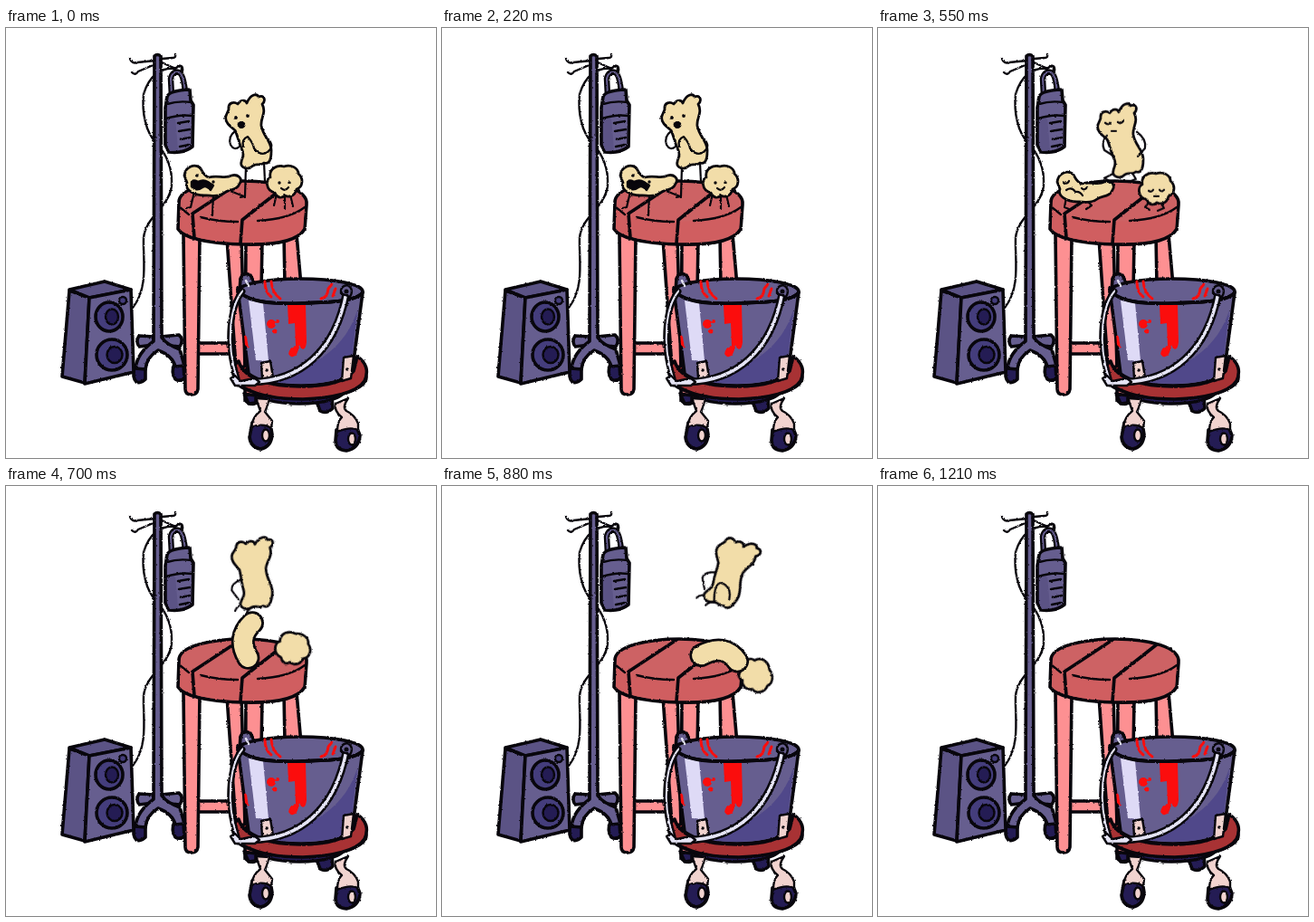
These frames come from a looping animation (475 by 475 pixels, 1.24 s). An HTML page:

```html
<!DOCTYPE html>
<html lang="en">
<head>
<meta charset="utf-8">
<title>Into the bucket</title>
<style>
  html, body { margin: 0; width: 100%; height: 100%; overflow: hidden; background: #fff; }
  svg { display: block; width: 100%; height: 100%; }
  path, ellipse, circle { stroke: #08060c; stroke-width: 3.6; stroke-linejoin: round; stroke-linecap: round; }
  .line { fill: none; }
  .thin { stroke-width: 2.4; }
  .flat { stroke: none; }
  .ink { fill: #08060c; }
  .purple { fill: #665e8f; }
  .mid { fill: #5b5385; }
  .dark { fill: #443d7c; }
  .navy { fill: #241c54; }
  .leg { fill: #fd9092; }
  .seat { fill: #cd6264; }
  .pale { fill: #f1d3cf; }
  .blood { fill: #fb0d0d; stroke: none; }
  .trickle { fill: none; stroke: #fb0d0d; stroke-width: 3; }
  .skin { fill: #f2dda9; stroke-width: 2.8; }
  .limb { fill: none; stroke-width: 2.2; }

  #tall, #round, #bean, .awake, .squat, .fly, .tuck { animation: 1240ms linear infinite; }
  .awake, .squat, .fly, .tuck { animation-timing-function: step-end; }
  .awake { animation-name: awake; }
  .squat { animation-name: squat; }
  .fly { animation-name: fly; }
  .tuck { animation-name: tuck; }
  #tall { transform-origin: 268px 114px; animation-name: tall; }
  #round { transform-origin: 308px 170px; animation-name: round; }
  #bean { animation-name: bean; }
  .spine path { fill: none; animation: spine 1240ms linear infinite; }
  .spine .edge { stroke-width: 26; }
  .spine .core { stroke: #f2dda9; stroke-width: 20.5; }

  @keyframes awake { 0% { visibility: visible } 25%, 100% { visibility: hidden } }
  @keyframes squat { 0% { visibility: hidden } 25% { visibility: visible } 49%, 100% { visibility: hidden } }
  @keyframes fly { 0% { visibility: hidden } 49% { visibility: visible } 92%, 100% { visibility: hidden } }
  @keyframes tuck { 0% { visibility: hidden } 62% { visibility: visible } 92%, 100% { visibility: hidden } }

  @keyframes tall {
    0%, 20% { transform: none; animation-timing-function: ease-in-out }
    32% { transform: translate(-1px, 8px) }
    46% { transform: translate(0, 10px); animation-timing-function: ease-in }
    56.45% { transform: translate(4px, -18px) rotate(8deg); animation-timing-function: ease-out }
    63.7% { transform: translate(27px, -50px) rotate(21deg); animation-timing-function: ease-in }
    70.97% { transform: translate(49px, -21px) rotate(34deg) }
    78.2% { transform: translate(63px, 55px) rotate(68deg) }
    85.48% { transform: translate(72px, 147px) rotate(103deg) }
    91%, 100% { transform: translate(72px, 236px) rotate(115deg) }
  }
  @keyframes round {
    0%, 20% { transform: none; animation-timing-function: ease-in-out }
    32% { transform: translate(0, 6px) }
    46% { transform: translate(0, 8px) }
    51% { transform: translate(4px, -6px) }
    56.45% { transform: translate(9px, 10px) rotate(12deg) }
    63% { transform: translate(24px, 12px) rotate(40deg) }
    70.97% { transform: translate(38px, 39px) rotate(70deg) }
    85.48% { transform: translate(37px, 136px) rotate(110deg) }
    90%, 100% { transform: translate(37px, 175px) rotate(120deg) }
  }
  @keyframes bean {
    0%, 20% { transform: none }
    32%, 100% { transform: translate(1px, 7px) }
  }
  @keyframes spine {
    0%, 48% { d: path("M208 172Q225 189 249 178") }
    56.45% { d: path("M272 151Q254 168 267 190") }
    63.7% { d: path("M269 173Q276 157 300 168") }
    70.97% { d: path("M286 187Q312 173 326 193") }
    78.2% { d: path("M322 192Q344 199 336 232") }
    85.48% { d: path("M335 233Q351 256 338 276") }
    91%, 100% { d: path("M334 322Q354 344 338 365") }
  }
</style>
</head>
<body>
<svg viewBox="0 0 475 475">
  <defs>
    <filter id="rough" filterUnits="userSpaceOnUse" x="0" y="0" width="475" height="475" color-interpolation-filters="sRGB">
      <feTurbulence type="fractalNoise" baseFrequency=".35" numOctaves="2" seed="4"/>
      <feDisplacementMap in="SourceGraphic" scale="2.2" xChannelSelector="R" yChannelSelector="G"/>
    </filter>
  </defs>

  <g filter="url(#rough)">
    <!-- drip stand -->
    <path class="line thin" d="M187 45C171 43 158 53 152 73C150 93 154 115 166 127C177 139 184 155 183 174C180 199 154 208 152 232C151 255 158 286 140 309"/>
    <path class="line thin" d="M137 34Q139 40 145 38L165 36M172 34L184 33Q188 33 187 29M165 40L146 48Q143 53 139 49M172 38L183 43Q188 46 190 42"/>
    <path class="purple" d="M163 341L147 340Q143 346 147 352L163 350ZM171 341L191 339Q197 344 192 352L171 350Z"/>
    <path class="navy" d="M142 375L154 376L154 388Q149 393 144 391Q139 386 142 375ZM186 371L196 372L197 387Q192 391 187 388Q182 380 186 371Z"/>
    <path class="purple" d="M164 31Q167 28 171 31L172 342Q178 350 192 355L197 373L187 374Q184 362 168 356Q155 364 154 377L143 376Q145 359 163 346Z"/>
    <path class="line" d="M191 42Q196 42 194 49"/>
    <path class="line" d="M183 75L182 56Q184 47 191 49Q196 51 198 71" style="stroke-width:6.500"/>
    <path class="line" d="M183 75L182 56Q184 47 191 49Q196 51 198 71" style="stroke:#665e8f;stroke-width:2"/>
    <path class="purple" d="M178 76Q180 69 203 68L204 80L207 85L206 131Q196 139 180 137L176 129L176 88Z"/>
    <path class="mid flat" d="M178 101L187 99L190 135L181 136L178 129Z"/>
    <path class="line thin" d="M178 84Q190 80 205 82M177 100Q192 95 206 97"/>
    <path class="line" d="M190 105L202 103M191 114L203 112M193 123L203 121M192 131L202 129" style="stroke-width:2.500"/>

    <!-- speaker -->
    <path class="mid" d="M70 290L92 298L87 392L62 385Z"/>
    <path class="mid" d="M70 289L109 280L138 289L92 298Z"/>
    <path class="purple" d="M92 298L138 289L141 380L87 393Z"/>
    <ellipse class="dark" cx="114" cy="319" rx="15" ry="16"/>
    <ellipse class="navy thin" cx="117" cy="319" rx="7" ry="8.500"/>
    <ellipse class="dark" cx="117" cy="361" rx="17" ry="17"/>
    <ellipse class="navy thin" cx="120" cy="361" rx="8.500" ry="9"/>
    <circle class="dark thin" cx="129" cy="301" r="4"/>
    <circle class="ink flat" cx="131" cy="291" r="1.500"/>

    <!-- stool -->
    <path class="leg" d="M206 348H264V360H206Z"/>
    <path class="leg" d="M244 232H260L264 375H254ZM307 228H321L326 285H308Z"/>
    <path class="leg" d="M265 234H283L280 411Q272 420 264 411Z"/>
    <path class="leg" d="M196 228H214L212 399Q211 405 205 405Q198 405 198 399Z"/>
    <path class="seat" d="M191 193C190 176 230 169 262 169C300 169 334 178 332 195L330 222C322 236 293 240 261 239C227 238 197 233 190 222Z"/>
    <path class="flat" fill="#d05e60" d="M193 199Q220 214 262 214Q312 212 330 198L328 221C321 233 292 237 261 237C227 236 199 231 192 221Z"/>
    <path class="line" d="M259 170L206 205L208 232M308 175L261 212L259 238"/>
    <path class="line thin" d="M192 198L202 206M215 209Q234 214 256 214M278 213Q313 211 330 198"/>

    <!-- dolly -->
    <path class="navy" d="M342 410L360 408L361 420Q354 427 347 423ZM263 404L276 406L276 414L268 415Z"/>
    <ellipse class="navy" cx="324" cy="400" rx="50" ry="15"/>
    <ellipse cx="325" cy="386" rx="73" ry="23" fill="#a83234"/>
    <ellipse cx="325" cy="383" rx="62" ry="19" fill="#812529"/>

    <!-- bucket inside -->
    <path class="purple" d="M258 291L259 277Q262 269 270 273L275 283Z"/>
    <ellipse class="purple" cx="325" cy="291" rx="69" ry="14"/>
    <path class="trickle" d="M286 280Q286 292 293 297M293 280Q294 293 303 299M348 299Q355 298 356 288L360 283M361 296L364 288"/>
  </g>

  <g filter="url(#rough)">
    <!-- rounded friend -->
    <g id="round">
      <g class="awake"><path class="limb" d="M299 183L296 196M308 186V200M314 184L317 197"/></g>
      <g class="squat"><path class="limb" d="M300 184L295 190L300 193M312 185L316 191L309 194"/></g>
      <path class="skin" d="M297 182C286 179 287 167 292 165C290 155 300 151 307 153C315 150 323 155 323 161C329 166 328 176 321 178C319 187 311 187 308 185C304 189 299 187 297 182Z"/>
      <g class="awake">
        <circle class="ink flat" cx="302" cy="171" r="1.700"/><circle class="ink flat" cx="313" cy="171" r="1.700"/>
        <path class="limb" d="M304 177Q308 181 312 176"/>
      </g>
      <g class="squat"><path class="limb" d="M299 172Q302 174 304 171M311 171Q313 174 316 171M305 178H310"/></g>
    </g>

    <!-- tall friend -->
    <g id="tall">
      <g class="awake"><path class="limb" d="M265 152L264 186L259 187M285 148L286 170"/></g>
      <g class="squat"><path class="limb" d="M260 151L250 156L257 160M280 149L285 157L277 160"/></g>
      <g class="fly"><path class="limb" d="M256 124Q246 130 248 137L257 146M268 150Q257 150 255 159M278 150Q268 154 268 160"/></g>
      <path class="skin" d="M246 90C245 82 252 81 256 84C260 78 265 80 266 83C270 73 277 72 279 76C286 73 287 81 283 84C288 94 281 99 282 108C284 120 294 126 293 136C293 145 291 151 285 149C280 153 276 149 273 152C267 158 258 154 260 148C260 144 264 142 261 135C257 127 256 119 253 113C248 109 241 104 243 97Z"/>
      <g class="tuck"><path class="limb" d="M274 152Q262 135 268 130Q280 126 286 140"/></g>
      <g class="awake">
        <circle class="ink flat" cx="254" cy="99" r="1.900"/><circle class="ink flat" cx="267" cy="97" r="1.900"/>
        <ellipse class="ink flat" cx="260" cy="107" rx="4.500" ry="4"/>
        <path class="limb" d="M253 114Q245 120 248 129Q252 136 258 131M262 131Q260 123 267 120Q273 127 274 133Q281 142 289 137Q297 131 290 123"/>
      </g>
      <g class="squat">
        <path class="limb" d="M251 95Q255 98 257 95M265 94Q268 97 271 93M258 104H263"/>
        <path class="limb" d="M253 109Q246 116 250 125L261 132M286 105Q297 113 295 123L287 132"/>
      </g>
    </g>

    <!-- lying friend -->
    <g id="bean">
      <g class="awake"><path class="limb" d="M208 181L204 198L199 199M229 184L228 207M245 179L263 186"/></g>
      <g class="squat"><path class="limb" d="M207 180L205 191L210 193M230 184L235 189L229 193"/></g>
      <g class="awake">
        <path class="skin" d="M197 163C198 153 208 150 214 154C217 157 217 163 224 165C234 162 242 167 249 163C256 161 262 166 258 172C255 180 246 178 241 182C234 188 225 184 219 185C207 185 197 178 200 171Z"/>
        <path class="ink thin" d="M205 170Q208 167 212 170Q218 167 223 170L229 174L226 179Q221 173 217 176Q210 181 205 175Z"/>
        <circle class="ink flat" cx="211" cy="163" r="1.700"/><circle class="ink flat" cx="229" cy="170" r="1.700"/>
      </g>
      <g class="squat">
        <path class="skin" d="M197 163C198 153 208 150 214 154C217 157 217 163 224 165C234 162 242 167 249 163C256 161 262 166 258 172C255 180 246 178 241 182C234 188 225 184 219 185C207 185 197 178 200 171Z"/>
        <path class="limb" d="M204 164Q208 166 210 162M224 170Q227 173 230 169M207 172Q213 168 217 174Q222 173 225 178"/>
      </g>
    </g>
    <g class="fly spine">
      <path class="edge" d="M208 172Q225 189 249 178"/>
      <path class="core" d="M208 172Q225 189 249 178"/>
    </g>
  </g>

  <g filter="url(#rough)">
    <!-- bucket front -->
    <path class="purple" d="M256 289C266 304 302 305 327 304C359 303 387 302 394 292L382 383Q362 395 326 395Q285 395 268 382Z"/>
    <path class="flat" fill="#50488a" d="M388 312C376 350 345 377 284 389Q300 393 326 393Q361 393 380 382Z"/>
    <path class="flat" fill="#dedaf6" d="M268 301L284 304L290 368L276 367Z"/>
    <path class="blood" d="M311 306H331L332 347Q331 357 326 354L324 350Q322 365 315 363Q310 360 314 355L320 351L319 326L312 327ZM263 338L266 341L268 354L264 350Z"/>
    <circle class="blood" cx="293" cy="327" r="5"/><circle class="blood" cx="300" cy="324" r="2"/><circle class="blood" cx="297" cy="335" r="2.500"/>
    <path class="line" d="M256 287C262 305 302 305 327 304C359 303 388 302 394 292"/>

    <!-- tray rim and casters -->
    <path fill="#a83234" d="M257 368C247 375 249 390 264 398C283 408 308 410 328 410C360 409 388 403 396 390C401 379 398 369 388 363L384 379C374 392 350 396 326 396C294 396 263 389 257 368Z"/>
    <path class="pale thin" d="M282 370L292 368L295 386L283 388ZM373 364L384 362L381 387L371 390Z"/>
    <circle class="ink flat" cx="288" cy="378" r="1.800"/><circle class="ink flat" cx="377" cy="377" r="1.800"/>
    <path class="navy" d="M272 436Q281 428 292 437L294 449Q293 463 281 465Q270 463 269 452ZM365 444Q374 437 387 440L391 450Q390 464 376 467Q364 466 364 456Z"/>
    <path class="pale thin" d="M276 409L291 410Q288 420 286 424L294 434L293 442Q284 436 271 441Q272 430 281 423ZM364 415L378 409Q371 419 376 423Q385 427 389 437L389 444Q380 440 366 446Q366 434 371 430Q362 423 364 415Z"/>
    <ellipse class="pale thin" cx="287" cy="450" rx="4" ry="6.500"/>
    <ellipse class="pale thin" cx="382" cy="454" rx="4" ry="6.500"/>

    <!-- handle -->
    <g class="line">
      <path d="M261 291C248 307 242 346 255 387" style="stroke-width:7"/>
      <path d="M261 291C248 307 242 346 255 387" style="stroke:#e5e4f5;stroke-width:2"/>
      <path d="M272 391C324 390 364 358 376 292" style="stroke-width:8.500"/>
      <path d="M272 391C324 390 364 358 376 292" style="stroke:#e5e4f5;stroke-width:3.500"/>
    </g>
    <path class="thin" fill="#e5e4f5" d="M248 387L253 384L259 390L275 387L280 391L275 395L253 395Z"/>
    <path class="purple thin" d="M370 293Q369 285 377 284Q385 288 380 297Z"/>
    <circle class="ink flat" cx="376" cy="291" r="2.500"/>
    <path class="line" d="M265 279L268 285" style="stroke:#e5e4f5;stroke-width:2.500"/>
  </g>
</svg>
</body>
</html>
```
